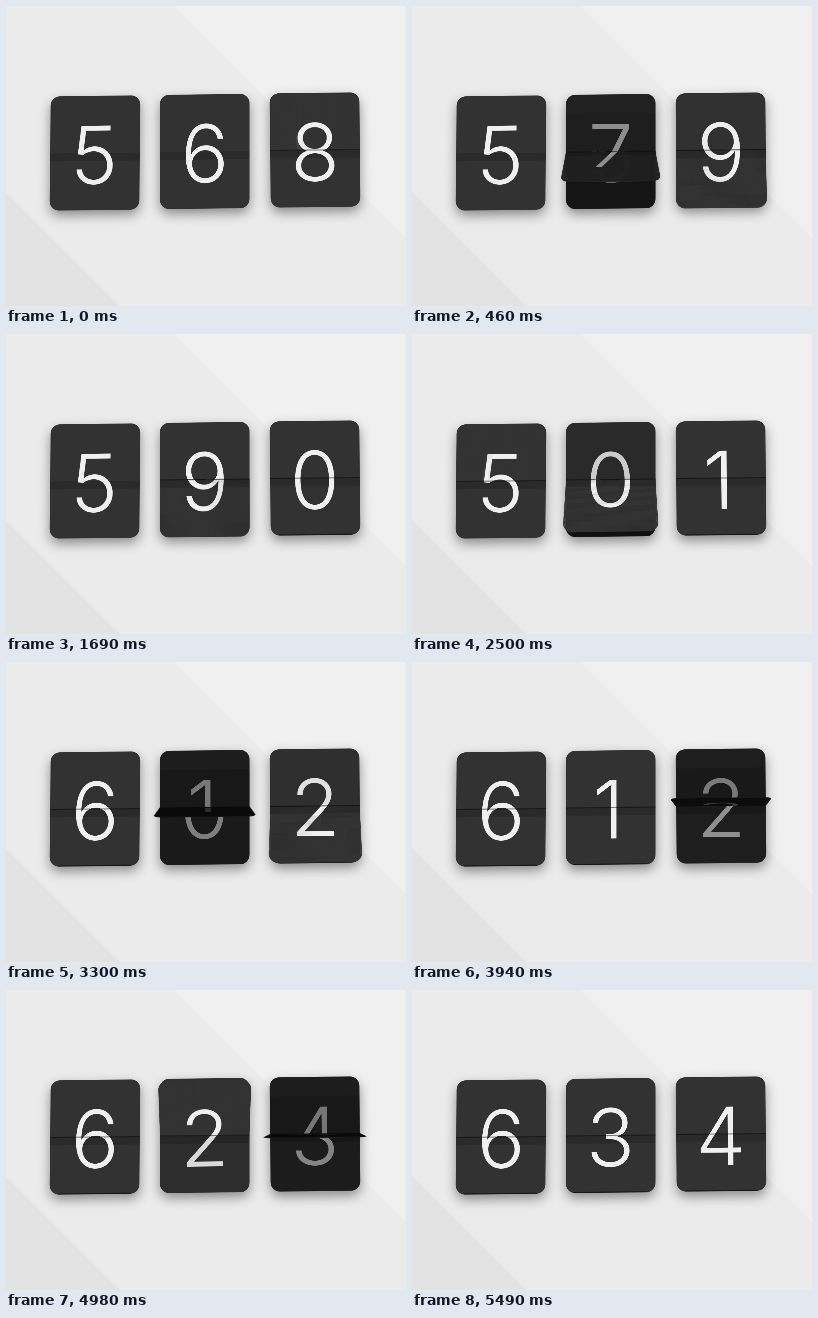
These frames come from a looping animation (400 by 300 pixels, 5.59 s). An HTML page with a canvas:

```html
<!DOCTYPE html>
<html lang="en">
<head>
<meta charset="utf-8">
<title>Flip counter</title>
<style>
html, body { margin: 0; width: 100%; height: 100%; overflow: hidden; background: #ebebeb; }
canvas { display: block; }
</style>
</head>
<body>
<canvas id="stage" width="400" height="300"></canvas>
<script>
const LOOP = 5590;
const FLIP = 560;    // length of one flip
const DEPTH = 450;   // viewing distance
const W = 44.7, H = 57;
const FW = 96, FH = 120, RES = 3;
const ctx = document.getElementById('stage').getContext('2d');

// flips: [start, new digit, optional time at which it snaps shut]
const cards = [
  { x: 89, y: 147, lean: -0.009, first: '5', flips: [[2485, '6']] },
  { x: 198.7, y: 145.5, lean: 0, first: '6',
    flips: [[130, '7'], [1165, '9'], [2103, '0'], [3010, '1'], [4032, '2'], [4860, '3']] },
  { x: 309, y: 144, lean: 0.009, first: '8',
    flips: [[-15, '9'], [890, '0', 1180], [1910, '1'], [2870, '2'], [3680, '3'], [4700, '4']] }
];

function plate(c) {
  c.beginPath();
  c.roundRect(-W, -H, 2 * W, 2 * H, 9);
}

function makeFace(digit) {
  const face = document.createElement('canvas');
  face.width = FW * RES;
  face.height = FH * RES;
  const c = face.getContext('2d');
  c.setTransform(RES, 0, 0, RES, FW / 2 * RES, FH / 2 * RES);
  plate(c);
  c.fillStyle = '#323232';
  c.fill();
  c.fillStyle = 'rgba(0,0,0,.16)';
  c.fillRect(-W, 0, 2 * W, 8);
  c.font = '300 80px Inter, "Liberation Sans", sans-serif';
  c.fillStyle = '#f0f0f0';
  const m = c.measureText(digit);
  const mid = (m.actualBoundingBoxRight - m.actualBoundingBoxLeft) / 2;
  c.fillText(digit, (digit === '1' ? -4 : 0) - mid, 31);
  return face;
}

const faces = {};
for (const d of '0123456789') faces[d] = makeFace(d);

function drawBackground() {
  ctx.setTransform(1, 0, 0, 1, 0, 0);
  ctx.fillStyle = '#ebebeb';
  ctx.fillRect(0, 0, 400, 300);
  wedge('#f0f0f0', 168, 0, 400, 0, 400, 232);
  wedge('#e3e3e3', 0, 186, 0, 300, 114, 300);
}

function wedge(color, ax, ay, bx, by, cx, cy) {
  ctx.fillStyle = color;
  ctx.beginPath();
  ctx.moveTo(ax, ay);
  ctx.lineTo(bx, by);
  ctx.lineTo(cx, cy);
  ctx.fill();
}

function drawHalf(face, lower, shade) {
  ctx.save();
  ctx.beginPath();
  ctx.rect(-50, lower ? 0 : -60, 100, 60);
  ctx.clip();
  ctx.drawImage(face, -FW / 2, -FH / 2, FW, FH);
  if (shade > 0) {
    plate(ctx);
    ctx.fillStyle = `rgba(0,0,0,${shade})`;
    ctx.fill();
  }
  ctx.restore();
}

// Project the turning leaf one thin strip at a time.
function drawLeaf(face, angle, lower) {
  const side = lower ? 1 : -1;
  const sin = Math.sin(angle), cos = Math.abs(Math.cos(angle));
  const shade = 0.85 * sin ** 8;
  const place = h => {
    const z = h * sin, s = DEPTH / (DEPTH - z);
    return { s, y: (side * h * cos + z * 0.04) * s };
  };
  const leftEdge = [], rightEdge = [];
  for (let h = 0; h < H; h++) {
    const a = place(h), b = place(h + 1);
    const top = Math.min(a.y, b.y);
    const row = lower ? FH / 2 + h : FH / 2 - h - 1;
    const w = FW * a.s;
    ctx.drawImage(face, 0, row * RES, FW * RES, RES,
      -w / 2, top, w, Math.abs(b.y - a.y) + 0.4);
  }
  if (shade < 0.01) return;
  for (const h of [0, H - 7, H - 2, H]) {
    const p = place(h), inset = h > H - 1 ? 6 : h > H - 3 ? 2 : 0;
    leftEdge.push([(-W + inset) * p.s, p.y]);
    rightEdge.unshift([(W - inset) * p.s, p.y]);
  }
  ctx.beginPath();
  for (const [x, y] of leftEdge.concat(rightEdge)) ctx.lineTo(x, y);
  ctx.closePath();
  ctx.fillStyle = `rgba(0,0,0,${shade})`;
  ctx.fill();
  if (cos < 0.12) {
    ctx.strokeStyle = '#101010';
    ctx.lineWidth = 1;
    ctx.stroke();
  }
}

function hinge() {
  ctx.fillStyle = 'rgba(0,0,0,.5)';
  ctx.fillRect(-W, -0.5, 2 * W, 1);
}

function drawCard(card, t) {
  let old = card.first, now = card.first, turn = 1, used = false;
  for (const [start, digit, snap] of card.flips) {
    if (t < start) break;
    old = now;
    now = digit;
    used = true;
    turn = snap && t >= snap ? 1 : Math.min(1, (t - start) / FLIP);
  }

  ctx.setTransform(1, -0.011, card.lean, 1, card.x, card.y);
  ctx.save();
  ctx.shadowColor = 'rgba(0,0,0,.42)';
  ctx.shadowBlur = 12;
  ctx.shadowOffsetY = 5;
  plate(ctx);
  ctx.fillStyle = '#2c2c2c';
  ctx.fill();
  ctx.restore();

  if (turn >= 1) {
    ctx.drawImage(faces[now], -FW / 2, -FH / 2, FW, FH);
    if (used) {
      hinge();
      ctx.fillStyle = 'rgba(0,0,0,.6)';
      ctx.fillRect(-W + 8, H - 0.8, 2 * W - 16, 1);
    }
    return;
  }

  const angle = Math.PI * (1 - Math.cos(Math.PI * turn)) / 2;
  const lower = angle > Math.PI / 2;
  const p = angle / Math.PI;
  drawHalf(faces[now], false, 0.42 * Math.sin(angle) ** 2);
  drawHalf(faces[old], true, Math.min(0.68, 0.9 * p));
  if (Math.sin(angle) > 0.5) {
    ctx.fillStyle = `rgba(0,0,0,${0.16 * Math.sin(angle) ** 4})`;
    ctx.fillRect(-W, -38, 2 * W, 38);
  }
  drawLeaf(faces[lower ? now : old], angle, lower);
  hinge();
}

const begin = performance.now();
function frame() {
  const t = (performance.now() - begin) % LOOP;
  drawBackground();
  for (const card of cards) drawCard(card, t);
  requestAnimationFrame(frame);
}
frame();
</script>
</body>
</html>
```
